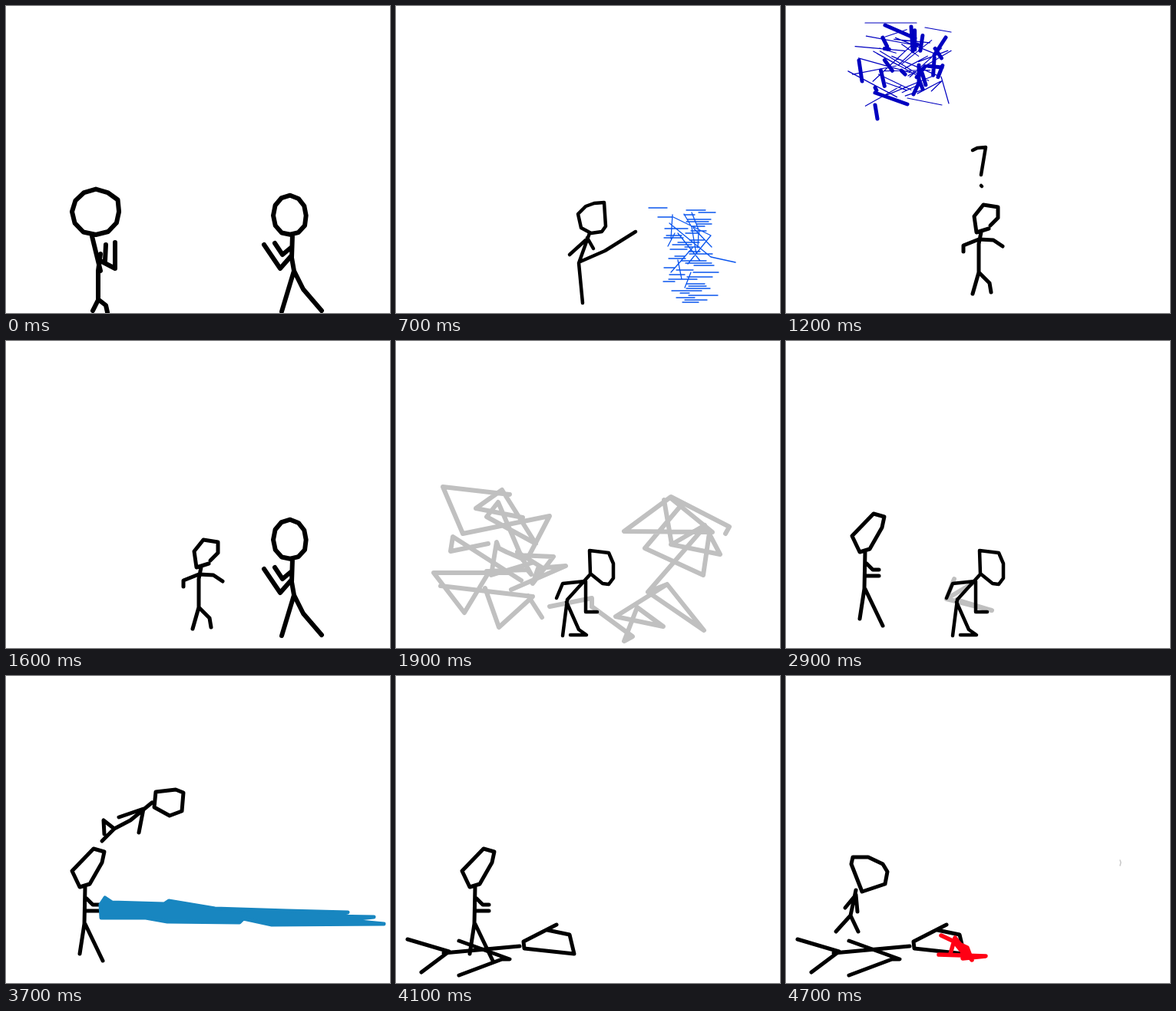
Animation of 500x400 px, one loop 4.8 s. Source, as an HTML page:

```html
<!DOCTYPE html>
<html lang="en">
<head>
<meta charset="utf-8">
<title>Stick fight</title>
<style>
html, body { margin: 0; width: 100%; height: 100%; overflow: hidden; background: #fff; }
svg { display: block; width: 500px; height: 400px; }
path { fill: none; stroke-linecap: round; stroke-linejoin: round; }
</style>
</head>
<body>
<svg id="stage" viewBox="0 0 500 400"></svg>
<script>
const LOOP = 4800, STEP = 100;
const BLACK = '#000', GRAY = '#c0c0c0', AZURE = '#0a55ee', NAVY = '#0000c0', BEAM = '#1886c0', RED = '#ff0014';
const stage = document.getElementById('stage');

const art = (color, width, d, fill = 'none') => ({ color, width, d, fill });

function seeded(seed) {
  return (low, high) => {
    seed = seed * 16807 % 2147483647;
    return Math.round(low + (high - low) * seed / 2147483647);
  };
}

const repeat = (count, make) => Array.from({ length: count }, (_, i) => make(i)).join(' ');

// A hand-drawn round head: a slightly uneven polygon
function head(cx, cy, rx, ry, seed) {
  const pick = seeded(seed);
  const points = repeat(12, i => {
    const angle = i * Math.PI / 6, wobble = pick(94, 104) / 100;
    return `${cx + rx * wobble * Math.cos(angle)} ${cy + ry * wobble * Math.sin(angle)}`;
  });
  return `M${points}Z`;
}

const guardLeft = art(BLACK, 6, head(117, 268, 32, 30, 71) +
  'M112 300 123 345 M123 323 120 345V383L113 397 M121 383 130 390 132 399 M130 311 129 332 M142 308V342L121 331');
const guardRight = art(BLACK, 6, head(370, 273, 22, 26, 35) +
  'M373 298 372 328 375 345 359 398 M375 345 387 369 411 397 M350 309 360 324 372 314 M336 311 357 342 371 326');
const kicker = art(BLACK, 4.5, `M258 257 271 256 273 287 268 294 254 296 241 289 237 271 247 261Z
  M252 296 238 335 243 387 M247 305 226 324 M249 302 257 316 M240 333 272 319 312 294`);
const puzzled = art(BLACK, 5, `M266 286 276 276V262L257 259 245 274 248 295 264 290
  M254 295 251 310V347L243 375 M231 320V312L251 304 270 305 282 313 M251 347 265 361 267 373`);
const question = art(BLACK, 4.5, 'M243 188 249 185 260 184 254 220 M254 234l1 1');
const bent = art(BLACK, 4.5, `M252 273 277 276 283 290V309L277 317 269 316 253 303Z
  M252 305 223 337 217 384 M222 340 238 376 248 383H227 M246 313 217 316 209 335 M247 313V353H262`);
const shooter = art(BLACK, 5, `M114 225 128 229 125 243 109 271 96 275 86 254Z
  M103 275 102 323 96 362 M103 323 126 371 M105 290 113 298H121 M103 306H121`);
const flyer = art(BLACK, 5, `M195 151 221 148 231 152 229 176 213 182 193 171Z
  M190 165 162 188 141 199 125 215 M141 199 127 188 128 206 M147 184 179 173 173 204`);
const watcher = art(BLACK, 5, `M107 236H87L85 245 99 281 129 271 132 255 126 245Z
  M91 279 84 312 65 333 M84 312 94 333 M77 302 91 285 93 307`);
const fallen = art(BLACK, 5, `M15 343 69 359 33 386 M62 361 161 352 M82 345 148 369H138L82 390
  M209 324 166 346 167 355 232 362 226 337 197 331`);

function dashBlur() {
  const pick = seeded(4711);
  const dashes = repeat(42, i => {
    const y = 263 + i * 3, inset = i * 0.6;
    return `M${pick(326 + inset, 405 - inset)} ${y}h${pick(12, 30 + i / 4)}`;
  });
  const slashes = repeat(11, i => {
    const x = pick(350, 405), y = pick(266, 350);
    return `M${x} ${y} ${pick(350, 411)} ${y + pick(15, 38)}`;
  });
  return dashes + slashes + 'M361 275 410 299 380 336M356 283 410 327 442 334';
}

function warpBlur(count, seed, minLength, maxLength, flat) {
  const pick = seeded(seed);
  return repeat(count, () => {
    const angle = pick(0, 628) / 100, radius = Math.sqrt(pick(0, 100)) * 5;
    const x = 154 + radius * Math.cos(angle), y = 78 + radius * Math.sin(angle);
    const half = pick(minLength, maxLength) / 2, tilt = pick(-100, 100) / 100 * flat;
    const dx = half * Math.cos(tilt), dy = half * Math.sin(tilt);
    return `M${x - dx} ${y - dy} ${x + dx} ${y + dy}`;
  });
}

function zigzag(count, seed, left, top, right, bottom) {
  const pick = seeded(seed);
  return 'M' + repeat(count, () => `${pick(left, right)} ${pick(top, bottom)}`);
}

const blur = art(AZURE, 1.3, dashBlur());
const warpThin = art(NAVY, 1.2, warpBlur(30, 913, 20, 75, 0.8) + 'M103 22H170M181 28 215 34M202 92 212 127M158 120 203 129');
const warpThick = art(NAVY, 5, warpBlur(16, 377, 3, 26, 2) +
  'M129 25 168 42M163 27 165 59M208 41 193 64M95 71 99 98M173 77V100L166 115M116 113 158 128M116 129 119 147');

const dustLeft = art(GRAY, 6, `M148 200 61 190 87 251 200 228 172 282 M165 230 104 218 138 194 182 264 118 229 133 210 165 285
  M120 264 71 274 74 255 163 312 M145 302H49L89 354 118 306 M58 319 178 333 134 373 116 322 M172 332 190 360`);
const dustMiddle = art(GRAY, 6, zigzag(9, 58, 118, 262, 182, 322) + zigzag(8, 29, 150, 275, 228, 335) + 'M200 346 255 335V346');
const dustRight = art(GRAY, 6, `M429 251 434 242 358 203 297 248 412 249 358 205 M349 207 359 265 402 240 422 278 358 265
  M373 212 324 270 400 305 408 250 M402 242 328 327 353 317 401 377 328 327 M353 317 286 359 348 372 314 347 297 391 308 385 255 346`);
const dustPeak = art(GRAY, 6, 'M140 205 182 162 225 240 160 222');
const dustLast = art(GRAY, 6, 'M219 310 209 336 246 314M209 336 268 351 222 337');

const beam = art(BEAM, 5, `M123 298 129 289 138 295 206 297 212 293 272 303 366 306 445 308 420 313 479 314
  440 318 492 323 346 324 309 316 304 321 210 320 182 315 124 315Z`, BEAM);
const bloodLine = art(RED, 5.5, 'M202 338 236 354 242 370 220 341 214 362');
const bloodPool = art(RED, 5.5, 'M199 363 260 365 230 368M218 345 234 365 224 350');
const speck = art('#c8c8c8', 1.5, 'M435 240 436 243 435 247');

const still = () => '';
const glide = (x1, y1, turn1, x2, y2, turn2) => p => {
  const mix = (a, b) => a + (b - a) * p;
  return `translate(${mix(x1, x2)} ${mix(y1, y2)}) rotate(${mix(turn1, turn2)} 178 180)`;
};

// Start and end are counted in steps
const clip = (start, end, shape, motion = still) => ({ start, end, shape, motion });
const clips = [
  clip(0, 5, guardLeft, glide(0, 0, 0, 120, -6, 0)),
  clip(0, 6, guardRight),
  clip(5, 10, kicker),
  clip(6, 10, blur),
  clip(10, 15, warpThin),
  clip(10, 15, warpThick),
  clip(10, 18, puzzled),
  clip(11, 16, question),
  clip(16, 18, guardRight, glide(0, -14, 0, -30, -14, 0)),
  clip(19, 27, dustLeft),
  clip(19, 28, dustMiddle),
  clip(19, 26, dustRight),
  clip(21, 24, dustPeak),
  clip(27, 32, dustLast),
  clip(18, 33, bent),
  clip(27, 42, shooter),
  clip(33, 37, flyer, glide(62, 130, -8, 0, 0, 0)),
  clip(37, 41, flyer, glide(0, 0, 0, -32, 184, 30)),
  clip(37, 41, beam),
  clip(41, 48, fallen),
  clip(42, 48, watcher),
  clip(43, 48, bloodLine),
  clip(45, 48, bloodPool),
  clip(42, 48, speck)
];

function draw(step) {
  const active = clips.filter(c => step >= c.start && step < c.end);
  stage.innerHTML = active.map(({ start, end, shape, motion }) =>
    `<path d="${shape.d}" stroke="${shape.color}" stroke-width="${shape.width}" style="fill:${shape.fill}"
      transform="${motion((step - start) / (end - start))}"/>`).join('');
}

let shown = -1;
function tick() {
  const step = Math.floor(performance.now() % LOOP / STEP);
  if (step !== shown) draw(shown = step);
  requestAnimationFrame(tick);
}
tick();
</script>
</body>
</html>
```
